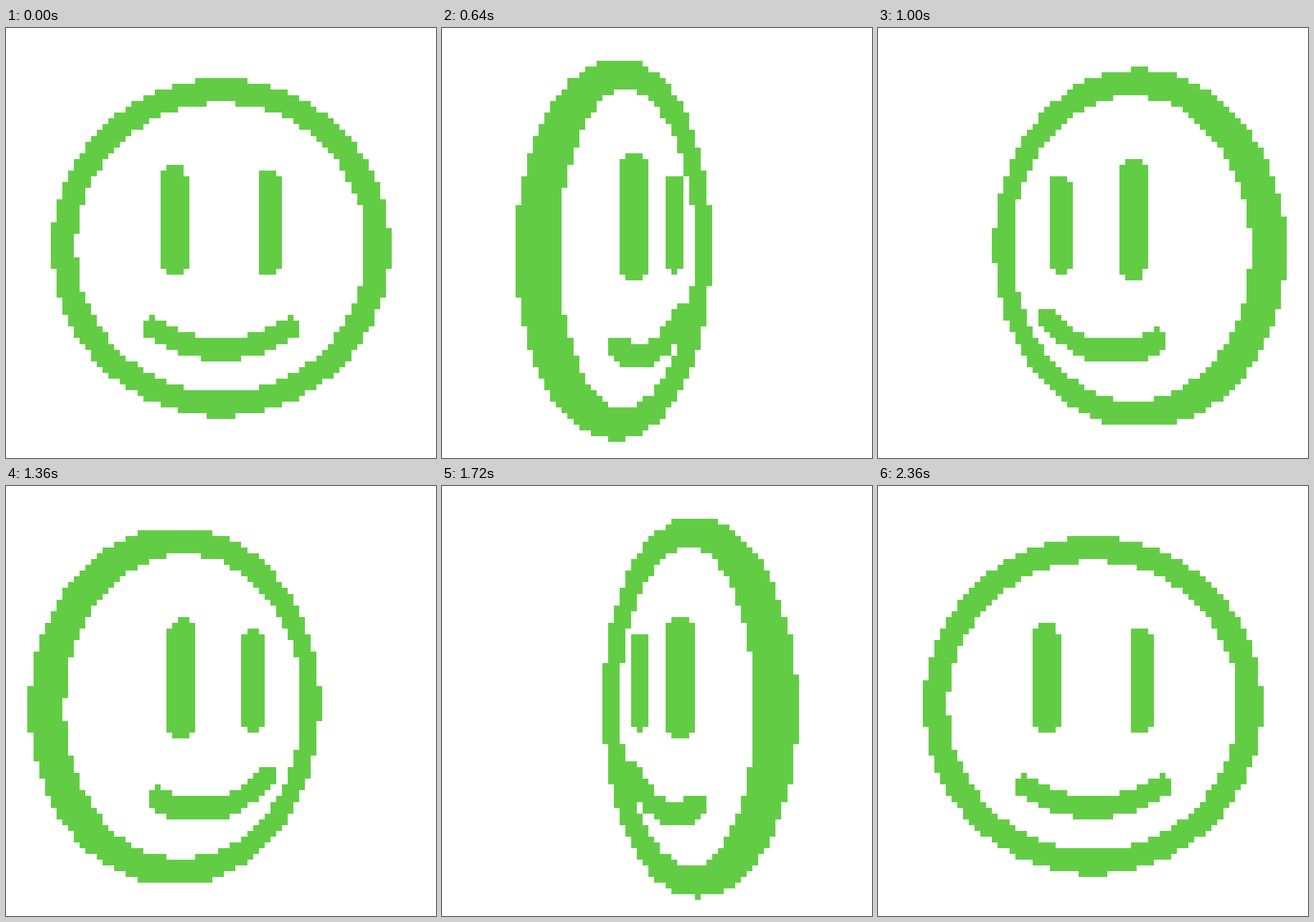
Animation of 748 by 748 pixels, one loop 2.44 s. Source, as an HTML page with a canvas:

```html
<!DOCTYPE html>
<html lang="en">
<head>
<meta charset="utf-8">
<title>Spinning smiley</title>
<style>
  html, body { margin: 0; width: 100%; height: 100%; overflow: hidden; background: #fff; }
  canvas { display: block; width: 748px; height: 748px; }
</style>
</head>
<body>
<canvas id="stage" width="748" height="748"></canvas>
<script>
const ctx = document.getElementById('stage').getContext('2d');

// Lengths are in cells, measured from the middle of the stage.
const CELL = 10.055, MID_X = 374.3, MID_Y = 373.55, VIEW = 55.3;
const STEP = 40, LOOP = 2440, LAST = 59;

// The face is made of round tubes, each a row of balls along a line.
const balls = [];
function tube(count, r, pointAt) {
  for (let i = 0; i <= count; i++) {
    const [x, y] = pointAt(i / count);
    balls.push({ x, y, r });
  }
}

const arc = (cx, cy, r, from, to) => t => {
  const a = from + (to - from) * t;
  return [cx + r * Math.sin(a), cy + r * Math.cos(a)];
};
const upright = (x, top, bottom) => t => [x, top + (bottom - top) * t];

tube(600, 2.1, arc(-0.05, 0.87, 27.13, 0, 2 * Math.PI));
tube(60, 2.12, upright(-8.1, -11.25, 3.85));
tube(60, 2.12, upright(8.15, -10.75, 3.85));
tube(120, 1.85, arc(0, -2.9, 21.3, -0.6, 0.6));

const edge = (mid, n) => Math.round(mid + n * CELL);

function fillCell(col, row) {
  const left = edge(MID_X, col - 0.5), top = edge(MID_Y, row - 0.5);
  ctx.fillRect(left, top, edge(MID_X, col + 0.5) - left, edge(MID_Y, row + 0.5) - top);
}

// Fill the cells whose centres lie inside the disc.
function fillDisc(x, y, r) {
  for (let row = Math.ceil(y - r); row <= y + r; row++) {
    const half = Math.sqrt(r * r - (row - y) ** 2);
    for (let col = Math.ceil(x - half); col <= x + half; col++) fillCell(col, row);
  }
}

function draw(step) {
  const t = step / LAST;
  const angle = 2 * Math.PI * t * t * (3 - 2 * t);
  const sin = Math.sin(angle), cos = Math.cos(angle);
  ctx.fillStyle = '#fff';
  ctx.fillRect(0, 0, 748, 748);
  ctx.fillStyle = '#62cd44';
  for (const { x, y, r } of balls) {
    const scale = VIEW / (VIEW + x * sin);
    fillDisc(x * cos * scale, y * scale, r * scale);
  }
}

let shown = -1;
function tick() {
  const step = Math.min(LAST, Math.floor(performance.now() % LOOP / STEP));
  if (step !== shown) draw(shown = step);
  requestAnimationFrame(tick);
}
tick();
</script>
</body>
</html>
```
